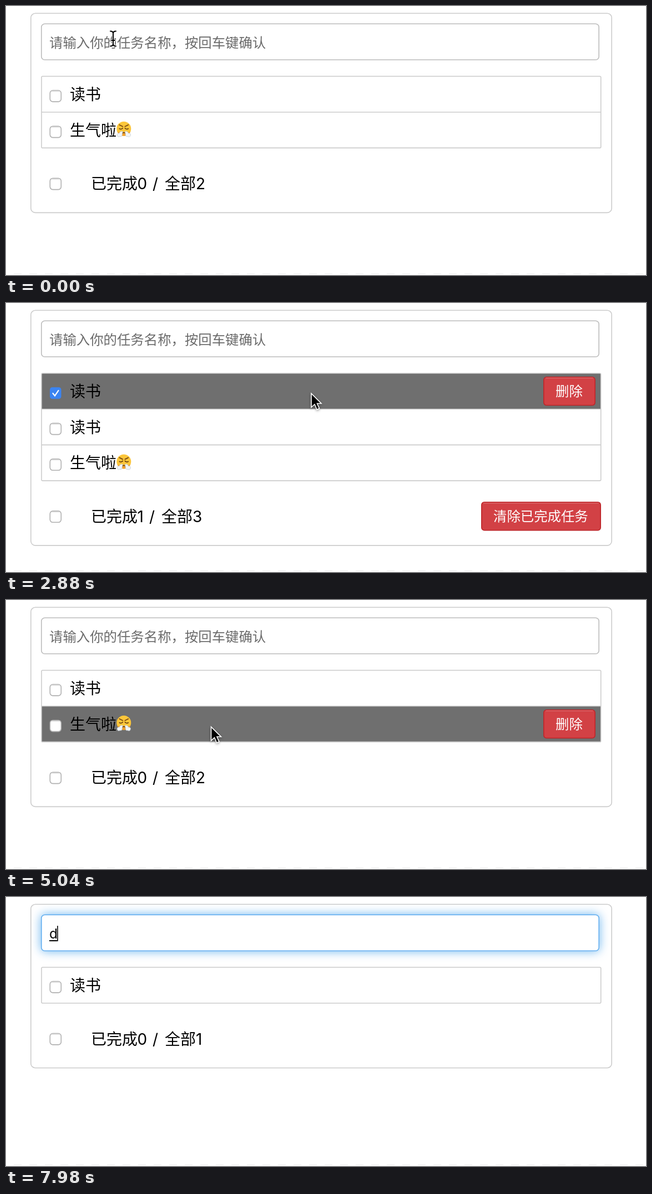
These frames come from a looping animation (1153x486 px, 8000 ms). An HTML page:

```html
<!DOCTYPE html>
<html lang="zh-CN">
<head>
<meta charset="utf-8">
<title>任务列表</title>
<style>
html, body { margin: 0; width: 100%; height: 100%; overflow: hidden; background: #fff; }
svg { display: block; }
text { font: 28px "Noto Sans CJK SC", "Noto Sans CJK", sans-serif; white-space: pre; }
.latin { font-family: Inter, "Noto Sans CJK SC", "Noto Sans CJK", sans-serif; }
.field { font-size: 24.4px; }
.btn { font-size: 24.4px; font-weight: 500; fill: #fff; }
.small { font-size: 21px; font-weight: 500; }
.focus { filter: drop-shadow(0 0 9px rgba(82, 168, 236, .85)); }
.dialog { filter: drop-shadow(0 5px 20px rgba(0, 0, 0, .55)); }
.pointer { filter: drop-shadow(0 2px 2px rgba(0, 0, 0, .35)); }
</style>
</head>
<body>
<svg id="stage" width="1153" height="486" viewBox="0 0 1153 486"></svg>
<script>
const LOOP = 8000, STEP = 60, TOP = 127, ROW = 64.7;
const stage = document.getElementById('stage');

// time, x, y of the mouse
const path = [
  [0, 193, 59], [1500, 193, 59], [1680, 198, 58], [1800, 198, 60], [2040, 140, 150],
  [2340, 90, 162], [2580, 90, 162], [3180, 1010, 165], [3360, 1010, 165], [3660, 555, 168],
  [3960, 872, 110], [4140, 872, 110], [4440, 792, 122], [4740, 780, 122], [4980, 420, 215],
  [5220, 97, 305], [5880, 98, 303], [6120, 90, 226], [6300, 90, 226], [6780, 876, 340],
  [7080, 876, 340], [7260, 600, 200], [7500, 300, 62], [8000, 300, 62]
];
const typing = [[600, 'd'], [720, 'du'], [840, 'du s'], [960, 'du sh'], [1020, 'du shu'],
  [1200, '读书'], [1320, ''], [7920, 'd']];

const within = (t, a, b) => t >= a && t < b;

function mouseAt(t) {
  const i = path.findIndex(p => p[0] > t);
  const [t0, x0, y0] = path[i - 1], [t1, x1, y1] = path[i];
  const u = (t - t0) / (t1 - t0), e = u * u * (3 - 2 * u);
  return { x: x0 + (x1 - x0) * e, y: y0 + (y1 - y0) * e };
}

function stateAt(t) {
  const tasks = t < 1320 ? ['读书', '生气啦'] : t < 4080 ? ['读书', '读书', '生气啦']
    : t < 7080 ? ['读书', '生气啦'] : ['读书'];
  const all = within(t, 5340, 5760);
  const done = tasks.map((_, i) => all || i === 0 && within(t, 2460, 4080)
    || i === 1 && within(t, 6180, 7080));
  const typed = typing.filter(k => k[0] <= t).pop();
  return {
    tasks, all, done,
    text: typed ? typed[1] : '',
    focus: within(t, 120, 2460) || t >= 7500,
    dialog: within(t, 3300, 4080),
    hidden: within(t, 600, 1500) || t >= 7920,
    mouse: mouseAt(t)
  };
}

const rect = (x, y, w, h, r, fill, stroke = 'none', extra = '') =>
  `<rect x="${x}" y="${y}" width="${w}" height="${h}" rx="${r}" fill="${fill}" stroke="${stroke}" stroke-width="1.6" ${extra}/>`;
const text = (x, y, s, cls = '', fill = '') =>
  `<text x="${x}" y="${y}" class="${cls}" ${fill && `fill="${fill}"`}>${s}</text>`;
const line = (d, stroke, width, extra = '') =>
  `<path d="${d}" fill="none" stroke="${stroke}" stroke-width="${width}" stroke-linecap="round" ${extra}/>`;

const checkbox = (y, on) => on
  ? rect(79, y, 20.5, 21, 4.5, '#3b84f2') + line(`M84.5 ${y + 11}l3.5 4.5 6.5-9.5`, '#fff', 2.2)
  : rect(79.3, y + .3, 20, 20.4, 5, '#fff', '#b0b0b0') + line(`M83 ${y + 2}h12.5`, '#ddd', 1.5);

const redButton = (x, y, w, label, hover) =>
  rect(x + .8, y + .8, w - 1.6, 51, 5, hover ? '#b32a2c' : '#d24145', hover ? '#ad2427' : '#bd2529')
  + line(`M${x + 5} ${y + 2.5}h${w - 10}`, '#fff', 1.5, 'opacity=".2"')
  + text(x + 22, y + 35, label, 'btn');

const emoji = y => `<g transform="translate(212.3 ${y})">
  <circle r="13" fill="#fcc63a"/><path d="M-12 5A13 13 0 0 0 12 5Q0 12-12 5" fill="#f2a02c"/>`
  + line('M-8-7l6 3M8-7l-6 3', '#7a4a12', 1.8) + line('M-8 0q3 2 6-1M8 0q-3 2-6-1', '#5b3510', 1.6)
  + line('M-4 9q4-4 8 0', '#6b3a10', 1.8)
  + `<g fill="#f1f4f7" stroke="#b9c3cc" stroke-width=".7">
  <path d="M-2 5q-5-1-6 3-5 0-4 4 1 4 5 2 4 1 4-4z"/><path d="M2 5q5-1 6 3 5 0 4 4-1 4-5 2-4 1-4-4z"/></g></g>`;

function inputBox(s) {
  const frame = rect(63.8, 32.3, 1004.4, 65, 6, '#fff', s.focus ? '#62aef0' : '#bcbcbc',
    s.focus ? 'class="focus"' : '');
  const content = s.text ? text(78, 75, s.text, 'field latin', '#000')
    : text(78, 75, '请输入你的任务名称，按回车键确认', 'field', '#6b6b6b');
  const mark = s.text ? '<path id="mark" stroke="#000" stroke-width="2"/>' : '';
  const caret = s.focus ? '<path id="caret" d="M78 52v28" stroke="#000" stroke-width="1.6"/>' : '';
  return frame + content + mark + caret;
}

function taskRow(s, i) {
  const y = TOP + i * ROW, { x, y: my } = s.mouse;
  const over = s.dialog ? i === 0
    : !s.hidden && x > 64 && x < 1072 && my > y && my < y + ROW;
  return (over ? rect(64, y, 1007.5, ROW, 0, '#6f6f6f') : '')
    + checkbox(y + 25.2, s.done[i])
    + text(115, y + 43, s.tasks[i])
    + (s.tasks[i] === '生气啦' ? emoji(y + 30) : '')
    + (over ? redButton(968, y + 6, 94, '删除', s.dialog || x > 968) : '')
    + (i ? line(`M64.5 ${y}H1071`, '#ccc', 1.6) : '');
}

function footer(s, bottom) {
  const n = s.done.filter(Boolean).length, y = bottom + 75, dx = n === 1 ? -6 : 0;
  const { x, y: my } = s.mouse;
  return checkbox(bottom + 54.5, s.all)
    + text(153, y, '已完成') + text(236.5, y, n, 'latin')
    + text(264 + dx, y, '/', 'latin') + text(286 + dx, y, '全部')
    + text(342 + dx, y, s.tasks.length, 'latin')
    + (n ? redButton(856, bottom + 37.8, 216, '清除已完成任务', x > 856 && my > bottom + 38 && my < bottom + 90) : '');
}

const dialog = () => rect(176.5, -30, 783, 194, 4, '#fff', 'none', 'class="dialog"')
  + `<text x="205" y="44.5" fill="#444" style="font-size:23px">确认删除读书吗?</text>`
  + rect(694, 81, 111, 55, 6, '#fff', '#bdbdbd') + text(727, 116, '取消', 'small', '#5f5f5f')
  + rect(819.5, 80.5, 111.5, 56, 6, '#427deb') + text(853, 116, '确定', 'small', '#fff');

const beam = () => {
  const d = 'M-5-13.5q5 0 5 4V9.5q0 4-5 4M5-13.5q-5 0-5 4M0 9.5q0 4 5 4M-3 3H3';
  return line(d, '#fff', 4) + line(d, '#000', 2);
};
const arrow = () =>
  '<path class="pointer" d="M0 0V25L6 19.5 10 29 14.5 27 10.5 18H18Z" stroke="#fff" stroke-width="1.6"/>';
const hand = () => `<g class="pointer"><path d="M-2 3C-2-1 3-1 4 3L7 11c1-2 4-2 5 0 1-1 4-1 5 1 2-1 4 0 4 3C21 21 18 24 18 29H5C4 26-2 21-6 17-8 14-5 12-2 14L2 17Z"
  fill="#fff" stroke="#000" stroke-width="2" stroke-linejoin="round"/>`
  + line('M8 18v6M12 18v6M16 18v6', '#000', 1.5) + '</g>';

function pointer(s, bottom) {
  if (s.hidden) return '';
  const { x, y } = s.mouse, any = s.done.some(Boolean);
  const inField = y > 32 && y < 98 && x > 63 && x < 1069;
  const onBox = x < 105 && y > TOP && y < bottom + 80;
  const onDelete = x > 968 && y > TOP && y < bottom;
  const onClear = any && x > 856 && y > bottom + 38 && y < bottom + 90;
  const shape = s.dialog ? arrow() : inField ? beam() : onBox || onDelete || onClear ? hand() : arrow();
  return `<g transform="translate(${x} ${y})">${shape}</g>`;
}

function draw(t) {
  const s = stateAt(t), bottom = TOP + s.tasks.length * ROW;
  stage.innerHTML = line('M14 483.5H1153', '#f2f2f2', 1.5, 'stroke-dasharray="14 14" style="stroke-linecap:butt"')
    + rect(44.8, 13.3, 1046.4, bottom + 103.7, 8, '#fff', '#ccc')
    + inputBox(s)
    + s.tasks.map((_, i) => taskRow(s, i)).join('')
    + rect(64, TOP, 1007.7, bottom - TOP, 2, 'none', '#ccc')
    + footer(s, bottom)
    + (s.dialog ? dialog() : '')
    + pointer(s, bottom);
  if (s.text) {
    const end = 78 + stage.querySelector('.field').getComputedTextLength();
    stage.querySelector('#mark').setAttribute('d', `M78 79H${end - 1}`);
    stage.querySelector('#caret').setAttribute('d', `M${end} 52v28`);
  }
}

let last = -1;
function tick() {
  const t = Math.floor(performance.now() % LOOP / STEP) * STEP;
  if (t !== last) draw(last = t);
  requestAnimationFrame(tick);
}
tick();
</script>
</body>
</html>
```
